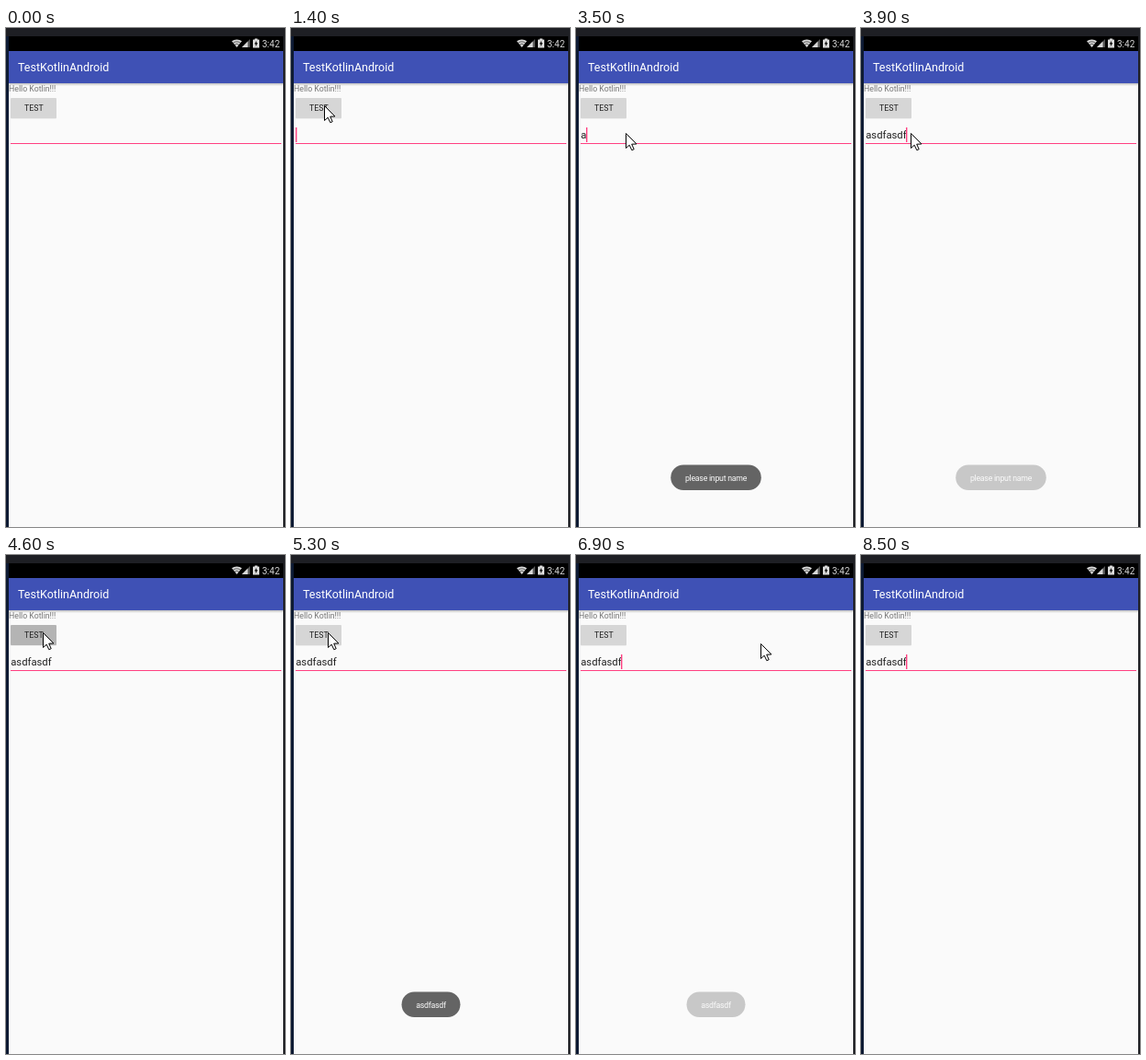
Recreate the animation shown at these times as an HTML page with a canvas. Size 304 by 542 pixels, loop 8.8 s.

```html
<!DOCTYPE html>
<html lang="en">
<head>
<meta charset="utf-8">
<title>Android input demo</title>
<style>
  html, body { margin: 0; width: 100%; height: 100%; overflow: hidden; background: #fafafa; }
  canvas { display: block; }
</style>
</head>
<body>
<canvas id="stage" width="304" height="542"></canvas>
<script>
const ctx = document.getElementById('stage').getContext('2d');
const LOOP = 8800, STEP = 100;
const ACCENT = '#ff4081', LIGHT = '#d9d9d9';

const WORD = 'asdfasdf', TYPE_AT = 3500, KEY_MS = 57;
const LAST_KEY = TYPE_AT + KEY_MS * (WORD.length - 1);
const BLINK_AT = 300, BLINK_MS = 456;

const CLICKS = [
  { at: 1600, label: 'please input name' },
  { at: 4600, label: WORD }
];

// Each move starts where the one before ended; "via" bends the path.
const ENTRY = { x: 276, y: 35 }, GONE_AT = 7100;
const MOVES = [
  { at: 500, ms: 850, x: 36, y: 84, via: { x: 60, y: 180 } },
  { at: 2400, ms: 200, x: 54, y: 114 },
  { at: 3900, ms: 420, x: 40, y: 84 },
  { at: 6700, ms: 300, x: 281, y: 102 }
];

const clamp = v => Math.max(0, Math.min(1, v));
const mix = (a, b, k) => a + (b - a) * k;

function rect(x, y, w, h, color) {
  ctx.fillStyle = color;
  ctx.fillRect(x, y, w, h);
}

function pill(x, y, w, h, r, color) {
  ctx.fillStyle = color;
  ctx.beginPath();
  ctx.roundRect(x, y, w, h, r);
  ctx.fill();
}

function setFont(size, spacing = 0) {
  ctx.font = `${size}px Roboto, sans-serif`;
  ctx.letterSpacing = spacing + 'px';
}

function text(str, x, y, size, color, spacing) {
  setFont(size, spacing);
  ctx.fillStyle = color;
  ctx.fillText(str, x, y);
}

function poly(points, color) {
  ctx.beginPath();
  points.forEach(([x, y]) => ctx.lineTo(x, y));
  ctx.closePath();
  ctx.fillStyle = color;
  ctx.fill();
}

function drawStatusIcons() {
  // Wi-Fi
  ctx.fillStyle = LIGHT;
  ctx.beginPath();
  ctx.moveTo(251.5, 21);
  ctx.arc(251.5, 21, 8.6, -Math.PI * 0.72, -Math.PI * 0.28);
  ctx.fill();
  ctx.strokeStyle = '#000';
  ctx.lineWidth = 0.6;
  for (const r of [3.6, 6.2]) {
    ctx.beginPath();
    ctx.arc(251.5, 21, r, -Math.PI * 0.75, -Math.PI * 0.25);
    ctx.stroke();
  }
  // Signal
  poly([[257, 21], [266, 21], [266, 12]], '#555');
  poly([[257, 21], [263.5, 21], [263.5, 14.5]], LIGHT);
  // Battery
  rect(271, 11.5, 3, 1.5, LIGHT);
  pill(269, 12.5, 7, 9, 0.6, LIGHT);
  poly([[273, 13.7], [270.7, 17.5], [272.2, 17.5], [271.8, 20.2], [274.3, 16.3], [272.8, 16.3]], '#000');
}

function drawScreen() {
  rect(0, 0, 304, 542, '#fafafa');
  rect(0, 0, 304, 9, '#1e1f24');
  rect(0, 9, 3, 533, '#0d1a33');
  rect(302, 9, 2, 533, '#1e1f24');
  rect(3, 9, 299, 16, '#000');
  drawStatusIcons();
  text('3:42', 279, 20.5, 10, LIGHT);

  rect(3, 25, 299, 35, '#3f51b5');
  const shade = ctx.createLinearGradient(0, 60, 0, 63);
  shade.addColorStop(0, 'rgba(0,0,0,.24)');
  shade.addColorStop(1, 'rgba(0,0,0,0)');
  rect(3, 60, 299, 3, shade);
  text('TestKotlinAndroid', 13, 47, 12.5, '#fff');
  text('Hello Kotlin!!!', 3, 69.3, 8.75, '#757575');
}

function drawButton(t) {
  const last = CLICKS.findLast(c => t >= c.at);
  const press = last ? clamp(1 - (t - last.at) / 500) : 0;
  const g = Math.round(mix(214, 180, press));
  pill(5, 77, 50, 21.5, 1, 'rgba(0,0,0,.1)');
  pill(5, 76, 50, 22, 1, `rgb(${g},${g},${g})`);
  text('TEST', 20, 90, 8.75, '#212121');
}

// Typing keeps the caret lit and restarts its blinking.
function caretOn(t) {
  if (t < BLINK_AT) return false;
  const since = t < TYPE_AT ? t - BLINK_AT : Math.max(0, t - LAST_KEY);
  return Math.floor(since / BLINK_MS) % 2 === 0;
}

function drawInput(t) {
  const count = t < TYPE_AT ? 0 : Math.floor((t - TYPE_AT) / KEY_MS) + 1;
  const value = WORD.slice(0, count);
  text(value, 5.2, 120, 11.25, '#212121');
  rect(5, 125, 295, 1, ACCENT);
  if (caretOn(t)) {
    rect(Math.round(5 + ctx.measureText(value).width), 108, 1.4, 16, ACCENT);
  }
}

function drawToast(t, { at, label }) {
  const age = t - at;
  const alpha = Math.min(clamp(age / 400), clamp((2450 - age) / 450));
  if (alpha <= 0) return;
  setFont(8.75, -0.25);
  const width = ctx.measureText(label).width;
  const x = 152.5 - width / 2;
  ctx.globalAlpha = alpha;
  pill(x - 15.7, 474.5, width + 31.4, 27.5, 13.75, '#646464');
  ctx.globalAlpha = 1;
  // The lettering matches the page, so only the pill needs to fade.
  text(label, x, 491.7, 8.75, '#fafafa', -0.25);
}

function pointerAt(t) {
  let pos = ENTRY;
  for (const { at, ms, x, y, via } of MOVES) {
    if (t < at) break;
    const k = clamp((t - at) / ms);
    const along = (a, c, b) =>
      c === undefined ? mix(a, b, k) : mix(mix(a, c, k), mix(c, b, k), k);
    pos = { x: along(pos.x, via?.x, x), y: along(pos.y, via?.y, y) };
  }
  return pos;
}

function drawPointer(t) {
  if (t < MOVES[0].at || t >= GONE_AT) return;
  const { x, y } = pointerAt(t);
  ctx.save();
  ctx.translate(Math.round(x) + 0.5, Math.round(y) + 0.5);
  poly([[0, 0], [0, 16], [3.7, 12.7], [6.3, 18.2], [8.7, 17.2], [6.2, 11.7], [11.4, 11.5]], '#fff');
  ctx.strokeStyle = '#000';
  ctx.lineWidth = 1;
  ctx.stroke();
  ctx.restore();
}

function draw(now) {
  const t = Math.floor((now % LOOP) / STEP) * STEP;
  drawScreen();
  drawButton(t);
  drawInput(t);
  CLICKS.forEach(click => drawToast(t, click));
  drawPointer(t);
}

let start;
function tick(now) {
  start ??= now;
  draw(now - start);
  requestAnimationFrame(tick);
}
draw(0);
requestAnimationFrame(tick);
</script>
</body>
</html>
```
